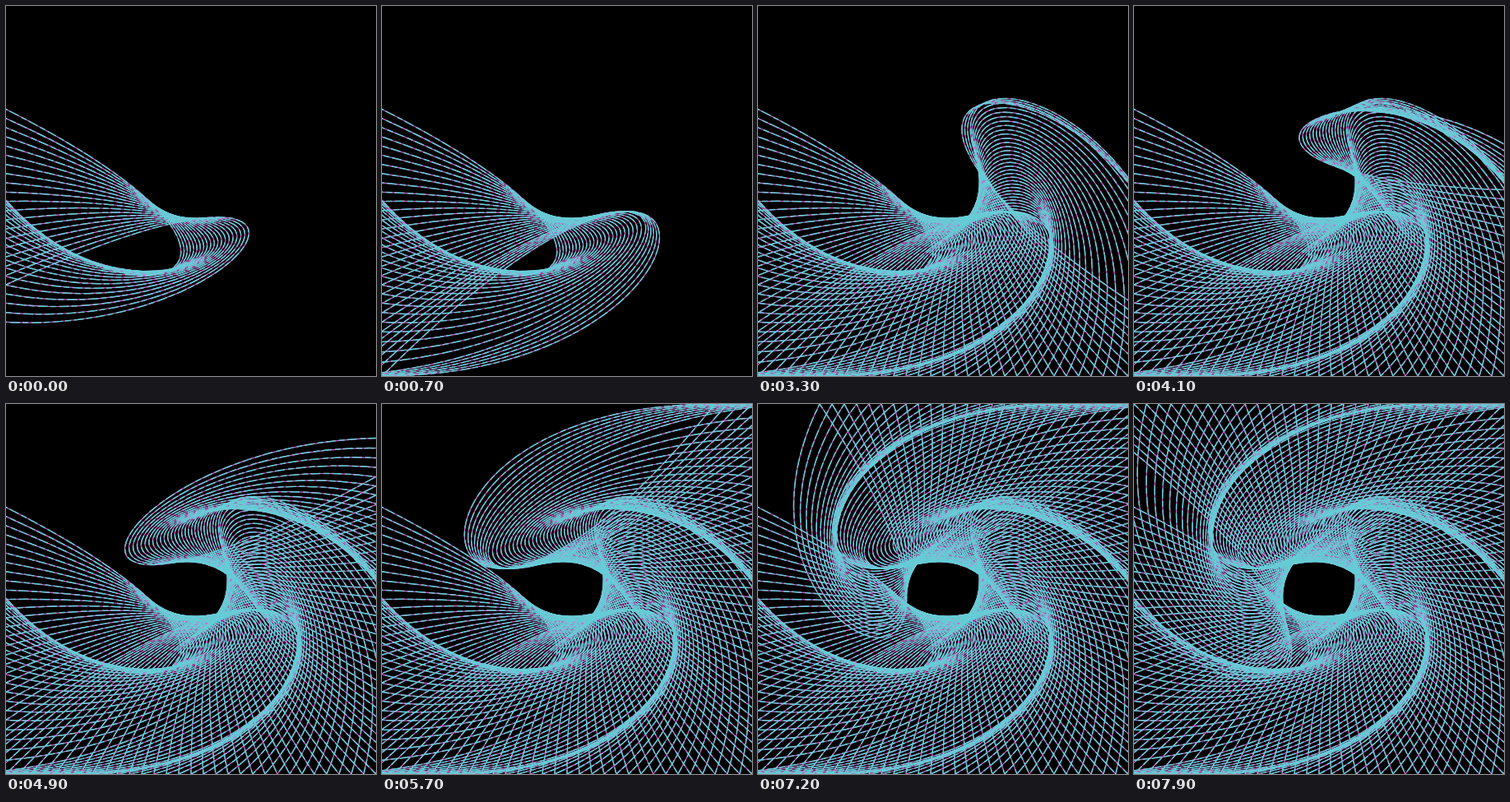
These frames come from a looping animation (450 px wide and 450 px high, 8 s). An HTML page with a canvas:

```html
<!DOCTYPE html>
<html>
<head>
<meta charset="utf-8">
<style>
  html, body { margin: 0; width: 100%; height: 100%; overflow: hidden; background: #000; }
  canvas { display: block; width: 450px; height: 450px; }
</style>
</head>
<body>
<canvas id="stage" width="450" height="450"></canvas>
<script>
const ctx = document.getElementById('stage').getContext('2d');
const LOOP = 8000, STEP = 100;

// Three points run counterclockwise round a frame wider than the stage.
const LEFT = -75, W = 600, H = 450, SPEED = 15;
const FIRST = 6, LAST = 25.5, PER_STEP = 1.46;

function onFrame(distance) {
  let d = distance % (2 * (W + H));
  if (d < H) return [LEFT, d];
  if ((d -= H) < W) return [LEFT + d, H];
  if ((d -= W) < H) return [LEFT + W, H - d];
  return [LEFT + W - (d - H), 0];
}

// A closed loop: the end point, its opposite point and one that runs ahead.
function loop(index) {
  const d = index * SPEED, path = new Path2D(), end = onFrame(d);
  path.moveTo(...end);
  path.bezierCurveTo(...onFrame(d + W + H), ...onFrame(d + H), ...end);
  return path;
}

const lastAt = step => Math.floor(LAST + step * PER_STEP);
const loops = Array.from({ length: lastAt(LOOP / STEP) }, (_, i) => loop(i));

function layer(last, color, width, dash) {
  ctx.strokeStyle = color;
  ctx.lineWidth = width;
  ctx.setLineDash(dash);
  for (let i = FIRST; i <= last; i++) {
    ctx.lineDashOffset = i * 17 % 43;
    ctx.stroke(loops[i]);
  }
}

let shown = -1;
function frame(now) {
  const step = Math.floor(now % LOOP / STEP);
  if (step !== shown) {
    shown = step;
    ctx.fillStyle = '#000';
    ctx.fillRect(0, 0, 450, 450);
    layer(lastAt(step), '#d46ad6', 1.2, []);
    layer(lastAt(step), '#66ccd6', 1.5, [12, 4, 7, 3]);
  }
  requestAnimationFrame(frame);
}
frame(performance.now());
</script>
</body>
</html>
```
